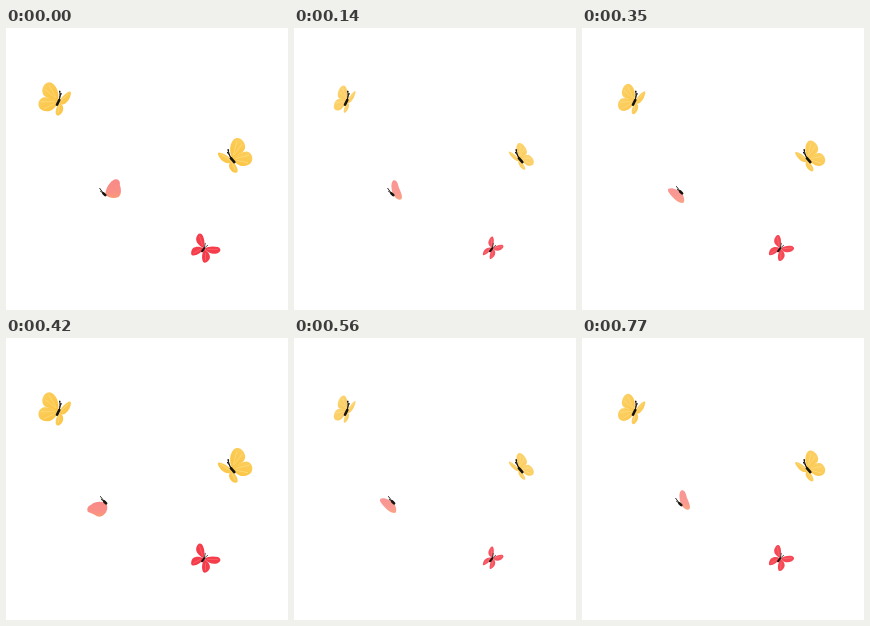
Animation of 282x282 px, one loop 0.84 s. Source, as an HTML page:

```html
<!DOCTYPE html>
<html lang="en">
<head>
<meta charset="utf-8">
<title>Butterflies</title>
<style>
  html, body { margin: 0; width: 100%; height: 100%; overflow: hidden; background: #fff; }
  svg { display: block; width: 100vw; height: 100vh; }
  .vein { fill: none; stroke-width: .6; stroke-linecap: round; }
  .body { fill: none; stroke: #17130f; stroke-linecap: round; stroke-linejoin: round; }
</style>
</head>
<body>
<svg viewBox="0 0 282 282">
  <defs>
    <linearGradient id="gold" x1="0" y1="0" x2="1" y2="1">
      <stop offset="0" stop-color="#fbcf60"/>
      <stop offset="1" stop-color="#fcc340"/>
    </linearGradient>
    <linearGradient id="rose" x1="0" y1="0" x2="0" y2="1">
      <stop offset="0" stop-color="#f88a88"/>
      <stop offset=".65" stop-color="#f98f86"/>
      <stop offset="1" stop-color="#fa9a74"/>
    </linearGradient>
    <g id="goldWings">
      <path fill="url(#gold)" d="M0-1C1-8-1-15-6-18.500C-10-21-14-18.500-15.500-14C-17-9-15-5-10-4C-7-3-3-2 0-1Z"/>
      <path fill="url(#gold)" d="M0-1C-6-4-12-5-16-4C-20-2-21 3-18.500 6.500C-16 10-10 10.500-6 8C-3 6-1 3 0-1Z"/>
      <path fill="url(#gold)" d="M1 0C3-4 7-9 11.500-10.200C13.500-10 12.500-6 11-3C9 1 5 4 1.500 2.500Z"/>
      <path fill="url(#gold)" d="M.5 1.500C-2 6-3.500 10-2 13C0 15.500 4 12 4.800 8C5.500 5 4 2 .5 1.500Z"/>
      <path class="vein" stroke="#ffdf8c" d="M-2-4L-9-16M-3-4L-13-12M-4 0L-17 0M-4 2L-14 7M3-1L10-8M1 4L0 11"/>
    </g>
    <g id="goldBody" class="body">
      <path stroke-width="2.600" d="M-1.300 3L1-1.700"/>
      <path stroke-width=".9" d="M1-2C1.500-5 1.800-7 1.500-10.500M1-2L2.600-8"/>
      <path stroke-width="1.500" d="M1.400-10.200v.3M2.600-8v.2"/>
    </g>
  </defs>

  <g transform="translate(52.300 73.700)">
    <use href="#goldWings" class="wings" data-tilt="23"/>
    <use href="#goldBody"/>
  </g>

  <g transform="translate(226.300 131.500) rotate(-15) scale(-1 1)">
    <use href="#goldWings" class="wings" data-tilt="23"/>
    <use href="#goldBody"/>
  </g>

  <g transform="translate(197.500 221.300)">
    <g class="wings" data-tilt="35" fill="#f53c4a">
      <path d="M.5-1C-4-3-8-7-7.300-11C-6.500-15-4-17-2-15.300C1-12 1.500-6 .5-1Z"/>
      <path d="M0-1C-4-3-8-3-10.500-1C-12.500 1-13 5-11.500 6C-8 7-2 4 0-1Z"/>
      <path d="M1-.5C4-3 10-3.500 14.500-2.200C18 0 17.500 2 14 4C10 5.500 4 4 1-.5Z"/>
      <path d="M.5 0C-1.500 4-2.200 9-.5 12.500C1.500 14.800 5.500 12 6.300 9C7 5 4 2 .5 0Z"/>
      <path class="vein" stroke="#ff727a" d="M-1-4L-4-13M-3 0L-10 4M4 0L14 0M2 4L2 11"/>
    </g>
    <g class="body">
      <path stroke-width="2" d="M-1.500 2L.7-1"/>
      <path stroke-width=".7" d="M.7-1L1.800-6M.7-1L4.200-4"/>
    </g>
  </g>

  <path id="pinkWing" fill="url(#rose)"/>
  <g id="pinkBody" class="body">
    <path stroke-width="2.600" d="M97.400 165.300L99.300 167.200"/>
    <path stroke-width=".9" d="M97.300 165L93.700 160.300M97 165L94.500 163.300"/>
  </g>
</svg>
<script>
  const STEP = 70;
  const FLAP = [1, .8, .58, .4, .58, .8];

  // Pink wing poses, from raised to lowered
  const POSES = [
    "M99.500 167C99 161 104 153 109 151.300C113 150.500 114.500 154 113.800 157C115.500 161 115.500 167 112.500 169C108 171 103 170 99.500 167Z",
    "M99.500 167C97 162 96.500 154 99.500 152.300C103 151.500 104 156 105 160C107 164 109 169 107.500 171C105 173 101 170 99.500 167Z",
    "M100.500 166C97 162 90 159 86.500 160.800C84.500 163 88 166 91 169.500C94 173 99 176 101.800 174.500C103 172 101.500 168 100.500 166Z",
    "M100.500 165.500C96 163 89 163 85.500 166.500C81.500 168 80.500 171 82 174C85 175 87 176 89 177C92 179.500 96 179 98 176.500C101.500 174 102 169 100.500 165.500Z"
  ];
  const ORDER = [0, 1, 2, 3, 2, 1];

  const wings = [...document.querySelectorAll(".wings")];
  const pinkWing = document.getElementById("pinkWing");
  const pinkBody = document.getElementById("pinkBody");
  let last = -1;

  function draw(step) {
    // Folding wings narrow, shorten a little and turn paler
    const open = FLAP[step % 6];
    const length = .76 + .24 * open;
    for (const w of wings) {
      const a = w.dataset.tilt;
      w.setAttribute("transform",
        `rotate(${a}) translate(0 -8) scale(${open} ${length}) translate(0 8) rotate(${-a})`);
      w.setAttribute("opacity", .7 + .3 * open);
    }
    const pose = ORDER[step >> 1];
    pinkWing.setAttribute("d", POSES[pose]);
    pinkWing.setAttribute("opacity", pose % 3 ? .9 : 1);
    pinkBody.setAttribute("transform", pose > 1 ? "translate(.8 -1.800)" : "");
  }

  function tick() {
    const step = Math.floor(performance.now() / STEP) % 12;
    if (step !== last) draw(last = step);
    requestAnimationFrame(tick);
  }
  tick();
</script>
</body>
</html>
```
